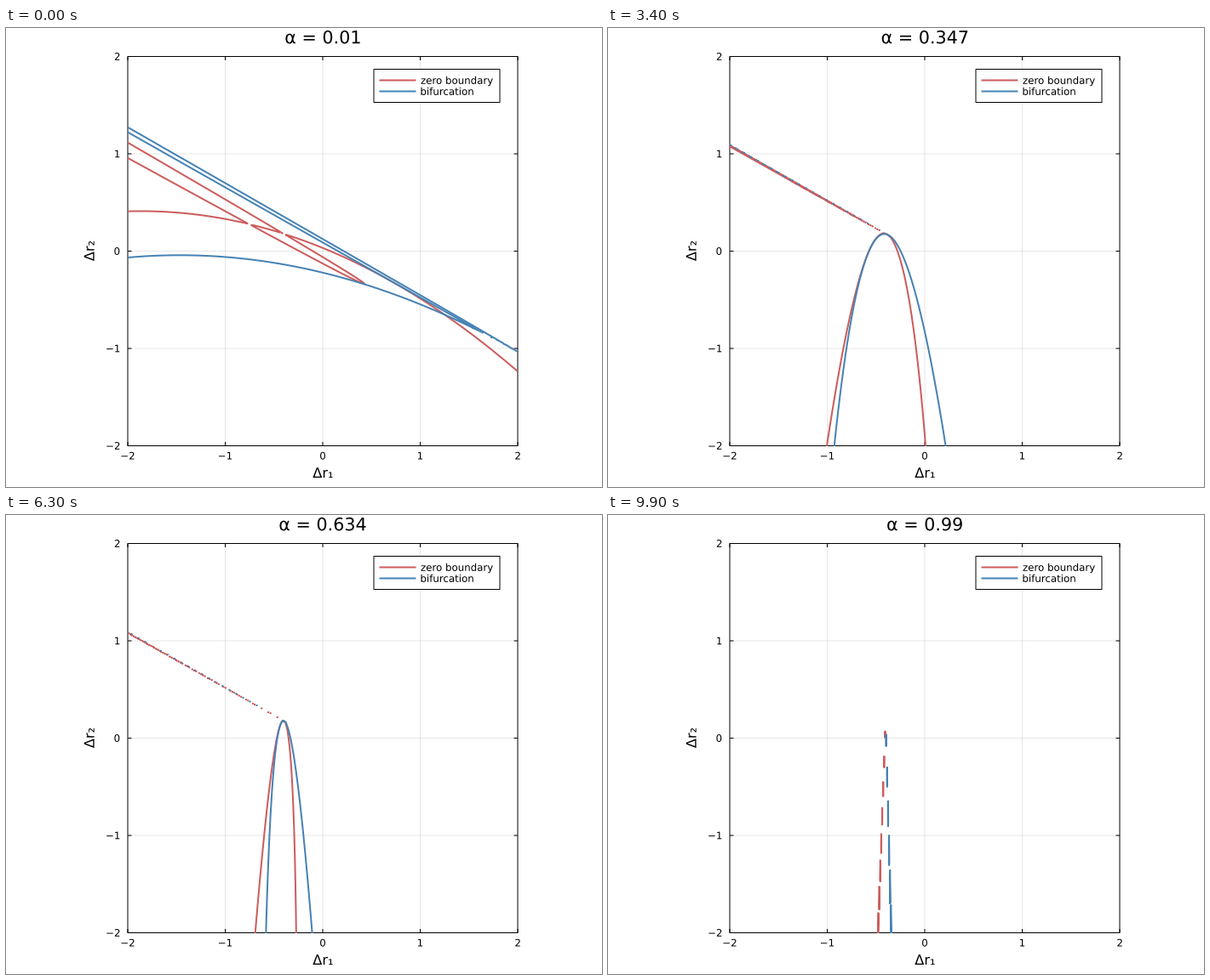
A matplotlib script for the animation above (10000 ms loop, 700 by 540 pixels).

```python
import numpy as np
import matplotlib.pyplot as plt
from matplotlib.animation import FuncAnimation
from matplotlib.collections import LineCollection
from matplotlib.lines import Line2D
from matplotlib.patches import PathPatch, Rectangle
from matplotlib.textpath import TextPath
from matplotlib.transforms import Affine2D

W, H, DPI = 700, 540, 100
FRAMES, INTERVAL = 100, 100
RED, BLUE = "#cd5c5c", "#4682b4"
PX = 72 / DPI
LEFT, RIGHT, TOP, BOTTOM = 143, 601, 33.5, 491.5
SMALL, MEDIUM, LARGE = 11.8, 16.25, 20.7

plt.rcParams["font.family"] = "DejaVu Sans"
plt.rcParams["path.simplify"] = False

# Quadratic map F(s, t) = A1 s + B1 s^2 + A2 t + B2 t^2 + (C1 B1 + C2 B2) s t
CENTER = (-0.4011, 0.17854)
A1, B1 = (0.9887, -0.315), (-0.3749, -10.47)
A2, B2 = (-1.0, 0.5931), (-29.33, 29.33 * 0.5654)
C1, C2 = 0.2325, 0.2956

axis = np.linspace(-2, 2, 400)
GX, GY = np.meshgrid(axis, axis)


def cross(u, v):
    return u[0] * v[1] - u[1] * v[0]


def in_basis(v):
    d = cross(B1, B2)
    return cross(v, B2) / d, cross(B1, v) / d


def mul(p, q):
    out = [0] * (len(p) + len(q) - 1)
    for i, u in enumerate(p):
        for j, v in enumerate(q):
            out[i + j] = out[i + j] + u * v
    return out


def parabola(r, a, b):
    """Zero on the curve a t + b t^2."""
    return cross(a, b) * cross(a, r) - cross(r, b) ** 2


def zero_boundary(r):
    return parabola(r, A1, B1) * parabola(r, A2, B2)


def fold(r):
    """Discriminant of the quartic in t left after eliminating s from F = r."""
    r1, r2 = in_basis(r)
    p1, p2 = in_basis(A1)
    q1, q2 = in_basis(A2)
    n = [r2, -q2, -1]
    m = [p2, C2]
    n2 = mul(n, n)
    lnm = mul([p1, C1], mul(n, m))
    km2 = mul([-r1, q1], mul(m, m)) + [0]
    e, d, c, b, a = (u + v + w for u, v, w in zip(n2, lnm, km2))
    i = 12 * a * e - 3 * b * d + c * c
    j = (72 * a * c * e + 9 * b * c * d - 27 * a * d * d
         - 27 * e * b * b - 2 * c * c * c)
    # The elimination adds a squared factor where m and n vanish together
    t = -p2 / C2
    extra = r2 - q2 * t - t * t
    return (4 * i * i * i - j * j) / extra ** 2


fig = plt.figure(figsize=(W / DPI, H / DPI), dpi=DPI, facecolor="white")
ax = fig.add_axes([LEFT / W, 1 - BOTTOM / H, (RIGHT - LEFT) / W, (BOTTOM - TOP) / H])
ax.set(xlim=(-2, 2), ylim=(-2, 2))
ax.set_autoscale_on(False)
ax.set_axis_off()


# Furniture is placed in pixels from the top left corner
def stroke(xs, ys, color="black", width=1.0, **kw):
    fig.add_artist(Line2D(np.array(xs) / W, 1 - np.array(ys) / H, color=color,
                          lw=width * PX, solid_capstyle="butt", snap=False, **kw))


def frame(x, y, w, h, fill, z):
    fig.add_artist(Rectangle((x / W, 1 - (y + h) / H), w / W, h / H, fc=fill,
                             ec="black", lw=PX, snap=False, zorder=z))


def glyphs(s, size, align):
    path = TextPath((0, 0), s, size=size)
    box = path.get_extents()
    return path.transformed(Affine2D().translate(-box.x0 - align * box.width, 0))


def label(x, y, s, size, align=0.5, angle=0):
    place = Affine2D().rotate_deg(angle).translate(x, H - y).scale(1 / W, 1 / H)
    patch = PathPatch(glyphs(s, size, align), fc="black", lw=0, snap=False,
                      transform=place + fig.transFigure, zorder=7)
    return fig.add_artist(patch)


MID_X, MID_Y = (LEFT + RIGHT) / 2, (TOP + BOTTOM) / 2
STEP = (RIGHT - LEFT) / 4
TICK = 4.5
for v in range(-2, 3):
    x, y = MID_X + v * STEP, MID_Y - v * STEP
    if abs(v) < 2:
        stroke([x, x], [TOP, BOTTOM], width=0.8, alpha=0.12, zorder=-2)
        stroke([LEFT, RIGHT], [y, y], width=0.8, alpha=0.12, zorder=-2)
    for a, b in ((TOP, TOP + TICK), (BOTTOM, BOTTOM - TICK)):
        stroke([x, x], [a, b], zorder=-1)
    for a, b in ((LEFT, LEFT + TICK), (RIGHT, RIGHT - TICK)):
        stroke([a, b], [y, y], zorder=-1)
    name = str(v).replace("-", "\u2212")
    label(x, 507.5, name, SMALL)
    label(133.3, y + 4.3, name, SMALL, align=1)
frame(LEFT, TOP, RIGHT - LEFT, BOTTOM - TOP, "none", -1)
label(MID_X, 529, "Δr₁", MEDIUM)
label(103.6, MID_Y, "Δr₂", MEDIUM, angle=90)
title = label(MID_X, 18.2, "α", LARGE)

frame(432, 48.5, 148, 39, "white", 5)
for y, color, name in ((61.5, RED, "zero boundary"), (74.5, BLUE, "bifurcation")):
    stroke([438.5, 481.5], [y, y], color, 2, zorder=6)
    label(487.5, y + 4.3, name, SMALL, align=0)

curves = [(func, ax.add_collection(LineCollection(
    [], colors=color, linewidths=2 * PX, capstyle="round", joinstyle="round")))
    for func, color in ((zero_boundary, RED), (fold, BLUE))]


def update(k):
    alpha = 0.01 + 0.98 * k / (FRAMES - 1)
    scale = (1 - alpha) ** 2 / alpha
    r = (GX - CENTER[0]) / scale, (GY - CENTER[1]) / scale
    for func, lines in curves:
        # Open polylines keep the tiniest loops visible as dots
        level = ax.contour(axis, axis, func(r), levels=[0])
        lines.set_segments(level.allsegs[0])
        level.remove()
    title.set_path(glyphs(f"α = {round(alpha, 3):g}", LARGE, 0.5))
    return [lines for _, lines in curves] + [title]


anim = FuncAnimation(fig, update, frames=FRAMES, interval=INTERVAL,
                     init_func=lambda: [], repeat=True, blit=False)
plt.show()
```
